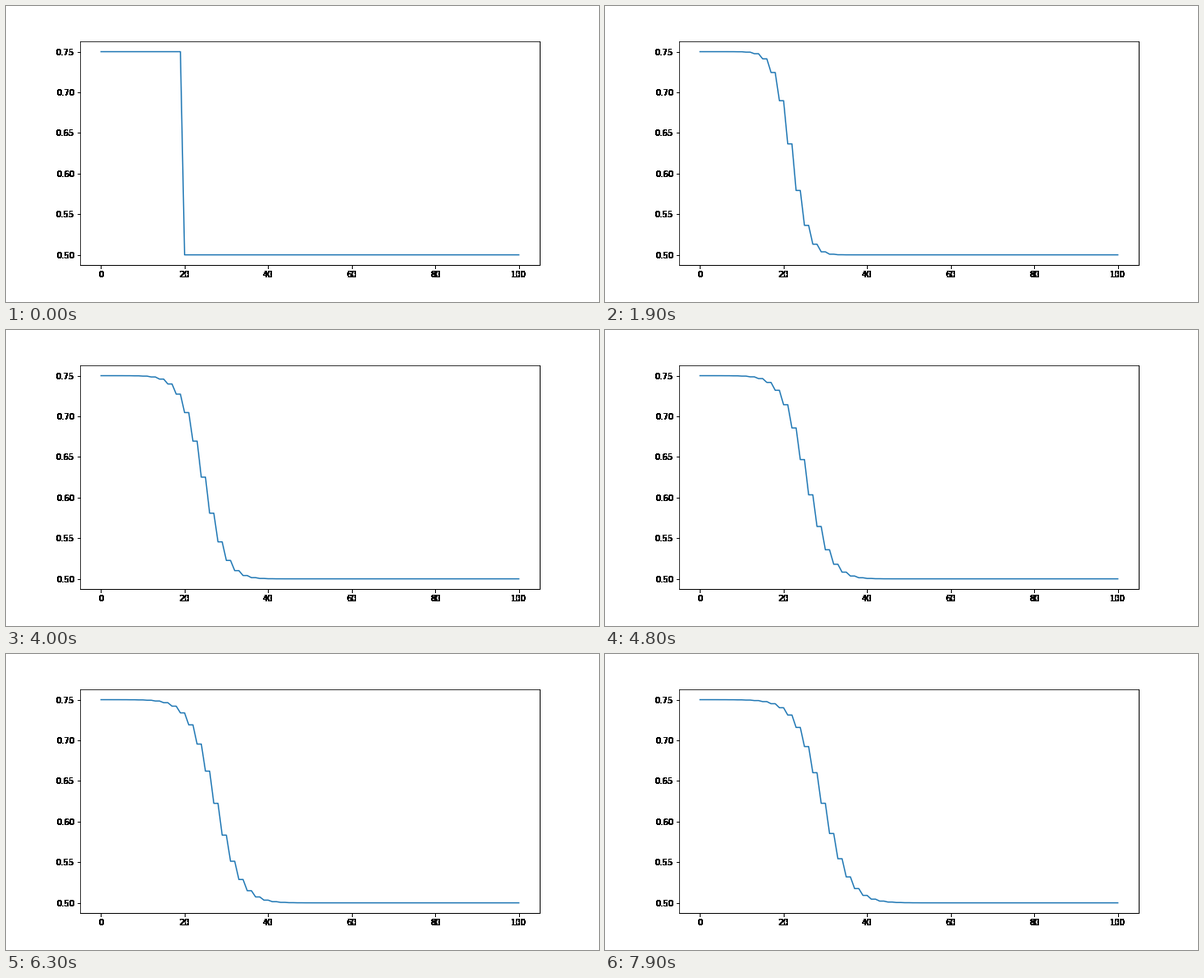
A matplotlib script for the animation above (8000 ms loop, 720 px wide and 360 px high).

```python
import numpy as np
import matplotlib.pyplot as plt
from matplotlib.animation import FuncAnimation

STEPS = 80
RATIO = 0.5  # dt / dx


def flux(u):
    return u * (u - 1)


def lax_friedrichs(u):
    left, right = u[:-2], u[2:]
    new = u.copy()
    new[1:-1] = (left + right) / 2 - RATIO / 2 * (flux(right) - flux(left))
    return new


def harden(img, dpi):
    """Turn every touched pixel solid black."""
    img[..., :3] = 0
    img[..., 3] = img[..., 3] > 0
    return img, 0, 0


x = np.arange(101)
states = [np.where(x < 20, 0.75, 0.5)]
for _ in range(STEPS - 1):
    states.append(lax_friedrichs(states[-1]))

plt.rcParams["font.family"] = "DejaVu Sans"
plt.rcParams["font.size"] = 10
fig, ax = plt.subplots(figsize=(10, 5), dpi=72, facecolor="white")
fig.subplots_adjust(left=0.125, right=0.9, bottom=0.125, top=0.88)
line, = ax.plot(x, states[0], color="#1f77b4", lw=1.5)

# Everything outside the plot area has no soft edges
for part in (ax.xaxis, ax.yaxis, ax.spines["right"], ax.spines["bottom"]):
    part.set_agg_filter(harden)


def update(step):
    line.set_ydata(states[step])
    return line,


anim = FuncAnimation(fig, update, frames=STEPS, interval=100,
                     repeat=True, repeat_delay=0)
plt.show()
```
